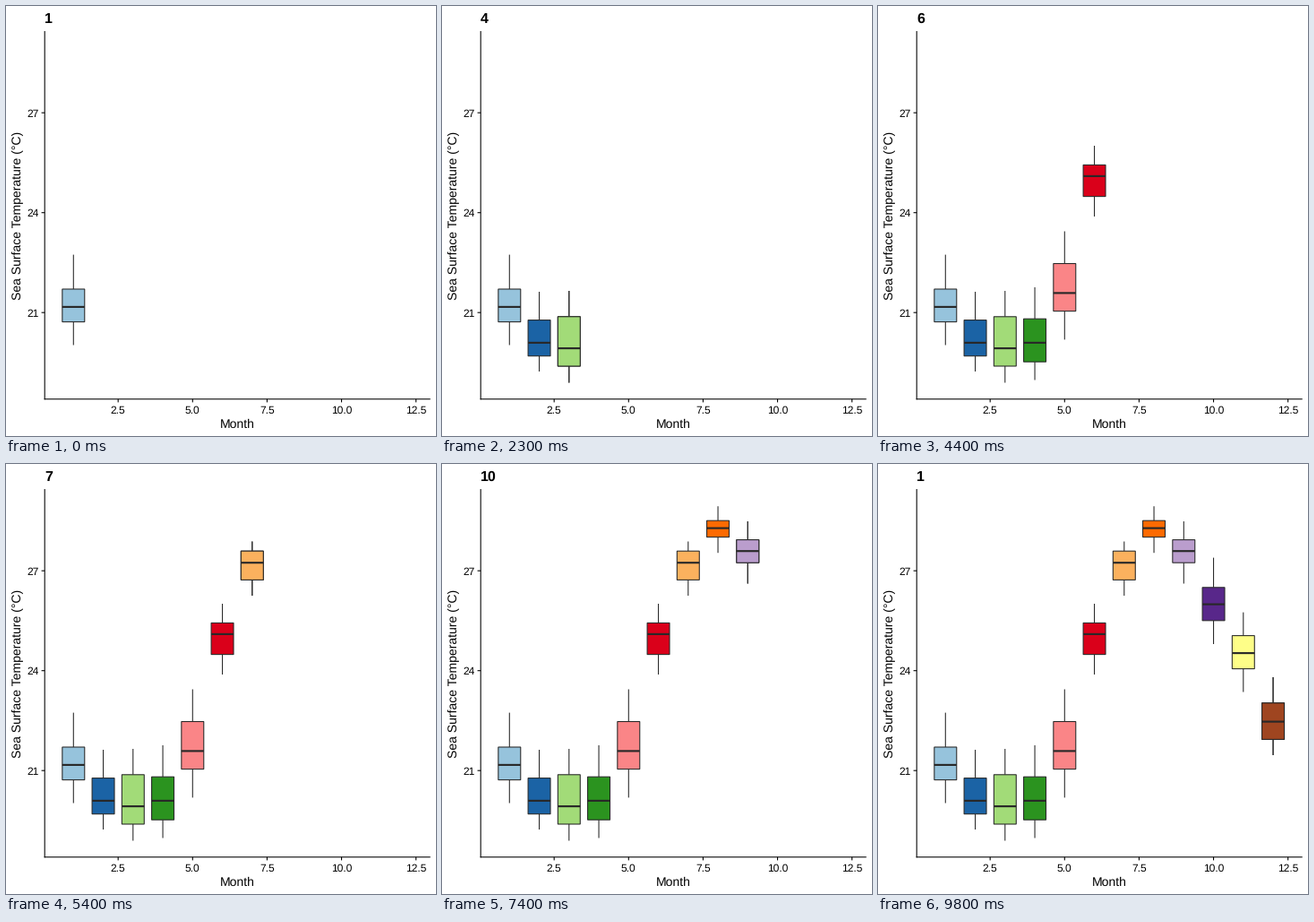
A matplotlib script for the animation above (10000 ms loop, 480 px wide and 480 px high).

```python
import matplotlib.pyplot as plt
from matplotlib.animation import FuncAnimation
from matplotlib.patches import Rectangle

SIZE, DPI = 480, 80
PT = 72 / DPI                     # points per pixel
FRAMES, STEP = 100, 100           # ms per frame

plt.rcParams.update({
    "font.family": "Liberation Sans",
    "text.hinting": "none",
    "path.snap": False,
})

INK = "#282828"
LINE = 1.07
LEFT, RIGHT, TOP, BOTTOM = 43.2, 473.7, 28, 438.8

# whisker top, upper quartile, median, lower quartile, whisker bottom (pixels)
BOXES = [
    (277.6, 316.0, 335.9, 352.6, 378.5, "#96c3dc"),
    (319.0, 350.6, 375.9, 390.7, 408.0, "#1b63a5"),
    (318.0, 346.8, 382.1, 402.0, 420.5, "#a2db78"),
    (314.0, 349.2, 375.9, 397.2, 417.5, "#2b931f"),
    (251.5, 287.5, 320.4, 340.6, 372.4, "#fa8587"),
    (156.0, 177.4, 189.9, 212.6, 235.0, "#da001a"),
    (86.5, 97.2, 110.2, 129.4, 147.0, "#fbb15e"),
    (47.2, 63.2, 71.6, 81.6, 99.2, "#fd6a02"),
    (64.0, 84.6, 97.2, 110.2, 133.5, "#ba9dcd"),
    (104.6, 137.8, 156.6, 174.8, 201.0, "#58278a"),
    (165.6, 191.6, 211.1, 228.6, 254.5, "#fefe88"),
    (238.0, 266.8, 287.6, 307.4, 325.0, "#9f4520"),
]

fig = plt.figure(figsize=(SIZE / DPI, SIZE / DPI), dpi=DPI, facecolor="white")
ax = fig.add_axes([0, 0, 1, 1])
ax.set_xlim(0, SIZE)
ax.set_ylim(SIZE, 0)
ax.axis("off")


def month_x(month):
    return 75.3 + 33.25 * (month - 1)


def temp_y(temp):
    return 342.2 - 37.17 * (temp - 21)


def line(xs, ys, color="black", width=LINE, z=1):
    return ax.plot(xs, ys, color=color, lw=width * PT, zorder=z,
                   solid_capstyle="butt", snap=False)[0]


def text(x, y, label, size, **style):
    style = {"ha": "center", "va": "baseline", "color": "black", **style}
    return ax.text(x, y, label, fontsize=size * PT, **style)


def draw_box(month, z):
    high, q3, median, q1, low, fill = BOXES[month - 1]
    x, half = month_x(month), 12.47
    body = Rectangle((x - half, q3), 2 * half, q1 - q3, facecolor=fill,
                     edgecolor=INK, lw=LINE * PT, zorder=z + 1, snap=False)
    ax.add_patch(body)
    return [
        line([x, x], [high, q3], INK, z=z),
        line([x, x], [q1, low], INK, z=z),
        body,
        line([x - half, x + half], [median] * 2, INK, 2 * LINE, z + 2),
    ]


def draw_axes():
    line([LEFT, LEFT], [TOP, BOTTOM + LINE / 2])
    line([LEFT - LINE / 2, RIGHT], [BOTTOM, BOTTOM])
    for month in (2.5, 5.0, 7.5, 10.0, 12.5):
        x = month_x(month)
        line([x, x], [BOTTOM, BOTTOM + 3.6])
        text(x, 455, f"{month:.1f}", 12)
    for temp in (21, 24, 27):
        y = temp_y(temp)
        line([LEFT - 3.6, LEFT], [y, y])
        text(36.5, y + 4.4, str(temp), 12, ha="right")
    text(258.4, 471, "Month", 14)
    text(17.2, 233.8, "Sea Surface Temperature (°C)", 14,
         rotation=90, rotation_mode="anchor")


def title_time(month):
    """When the heading switches to this month."""
    if month == 1:
        return 0
    return 500 + 900 * (month - 2) if month <= 7 else 5000 + 800 * (month - 7)


def box_times(month):
    """When the box appears, and when its second, darkening copy joins it."""
    if month == 1:
        return 0, 100
    settled = title_time(month) + (500 if month < 7 else 400)
    return settled - 200, settled


draw_axes()
heading = text(43, 19, "1", 16, ha="left", weight="bold")
months = range(1, len(BOXES) + 1)
marks = {m: draw_box(m, 3) for m in months}
overlays = {m: draw_box(m, 6) for m in months}


def show(artists, visible):
    for artist in artists:
        artist.set_visible(visible)


def update(frame):
    now = frame * STEP
    current = max(m for m in range(1, 14) if title_time(m) <= now)
    heading.set_text(str((current - 1) % 12 + 1))
    for m in months:
        appears, settles = box_times(m)
        show(marks[m], now >= appears)
        show(overlays[m], settles <= now < box_times(m + 1)[0])
    return [heading]


anim = FuncAnimation(fig, update, frames=FRAMES, interval=STEP,
                     repeat=True, repeat_delay=0, blit=False)
plt.show()
```
